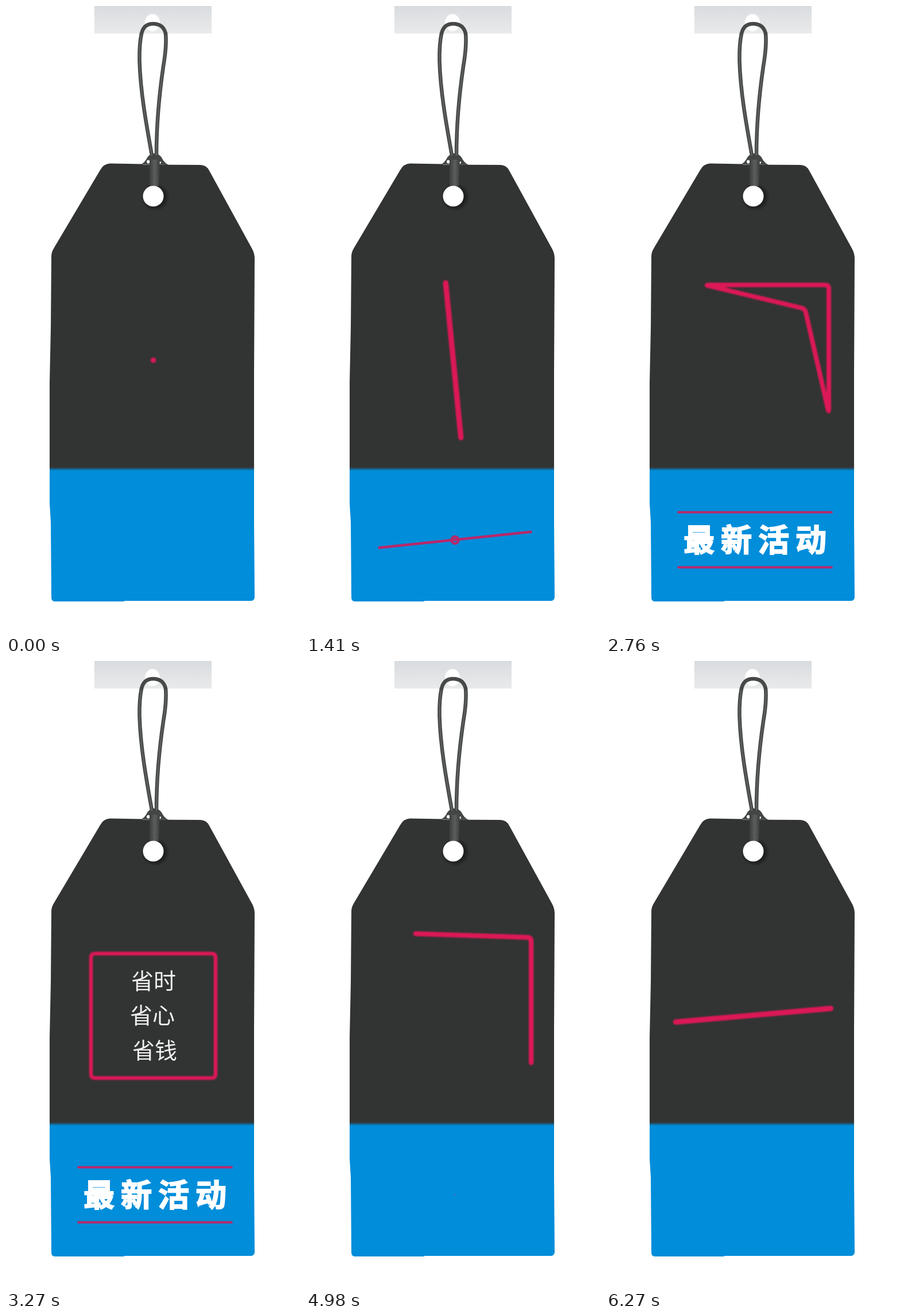
Animation, 512 px wide and 1093 px high, one loop 6300 ms. Source, as an HTML page with a canvas:

```html
<!DOCTYPE html>
<html lang="zh">
<head>
<meta charset="utf-8">
<style>
html, body { margin: 0; width: 100%; height: 100%; overflow: hidden; background: #fff; }
canvas { display: block; }
</style>
</head>
<body>
<canvas id="stage" width="512" height="1093"></canvas>
<script>
const ctx = document.getElementById('stage').getContext('2d');
const LOOP = 6300, STEP = 30;
const PINK = '#dc1857', PLUM = '#b8286a', DARK = '#323433', BLUE = '#008dda';
const CJK = '"Noto Sans CJK SC", "Noto Sans CJK", sans-serif';

const part = (t, a, b) => Math.min(1, Math.max(0, (t - a) / (b - a)));
const sine = p => (1 - Math.cos(Math.PI * p)) / 2;
const cubic = p => p < .5 ? 4 * p ** 3 : 1 - 4 * (1 - p) ** 3;
const mix = (a, b, p) => a + (b - a) * p;
const mixPt = (a, b, p) => [mix(a[0], b[0], p), mix(a[1], b[1], p)];

function stroke(d, color, width) {
  ctx.strokeStyle = color;
  ctx.lineWidth = width;
  ctx.stroke(new Path2D(d));
}
function fill(d, color) {
  ctx.fillStyle = color;
  ctx.fill(new Path2D(d));
}
function oval(x, y, rx, ry, color) {
  ctx.fillStyle = color;
  ctx.beginPath();
  ctx.ellipse(x, y, rx, ry, 0, 0, 7);
  ctx.fill();
}
function gradient(x0, y0, x1, y1, ...colors) {
  const g = ctx.createLinearGradient(x0, y0, x1, y1);
  colors.forEach((c, i) => g.addColorStop(i / (colors.length - 1), c));
  return g;
}
function cord(d) {
  stroke(d, '#3e4040', 6.5);
  stroke(d, '#5a5c5c', 3.5);
}

const tag = new Path2D('M79 436Q79 429 84 421L164 286Q170 275 181 274.5L238 275.5V276.5L338 277Q349 277 354 287' +
  'L429 424Q433 432 433 440L432 640V900L433 1031Q432 1037 426 1037H206V1038H85Q79 1038 79 1031' +
  'L78 900L76 868V655L78 560Z');

function drawTag() {
  fill('M154 0H358V48H154Z', gradient(0, 0, 0, 48, '#d9dcdf', '#e9eaeb'));
  oval(255, 29, 13, 15, '#fff');

  ctx.save();
  ctx.clip(tag);
  ctx.fillStyle = gradient(0, 804, 0, 810, DARK, BLUE);
  ctx.fillRect(0, 0, 512, 1093);
  const shade = ctx.createRadialGradient(260, 333, 16, 260, 333, 25);
  shade.addColorStop(0, '#1c1d1d');
  shade.addColorStop(1, '#1c1d1d00');
  oval(260, 333, 25, 25, shade);
  ctx.restore();

  fill('M236 276Q243 271 246 264Q252 256 258 257Q266 257 271 264Q275 273 283 277Z', '#444646');
  oval(248, 271.5, 3, 3, '#fff');
  oval(268, 273, 2, 2, '#fff');
  cord('M236 48Q232 66 232.5 96C234 150 245 210 254 260');
  cord('M278 48Q280 70 274 105C266 160 262 210 262 260');
  stroke('M236 48Q240 31 256 31Q274 31 278 48', '#474949', 6.5);
  fill('M250 268H268L266 314H250Z', gradient(249, 0, 269, 0, '#383a3a', '#5c5e5e', '#383a3a'));
  oval(256.5, 331.5, 18, 18, '#fff');
}

// Closed outline whose corners are trimmed by a short curve
function outline(pts) {
  const path = new Path2D(), n = pts.length;
  const toward = (a, b) => {
    const d = Math.hypot(b[0] - a[0], b[1] - a[1]);
    return d ? mixPt(a, b, Math.min(.5, 7 / d)) : a;
  };
  pts.forEach((p, i) => {
    path[i ? 'lineTo' : 'moveTo'](...toward(p, pts[(i + n - 1) % n]));
    path.quadraticCurveTo(...p, ...toward(p, pts[(i + 1) % n]));
  });
  path.closePath();
  return path;
}

const ELBOW = [[184, 475], [399, 475], [399, 701], [399, 475]];
const SQUARE = [[148, 510], [365, 510], [365, 727], [148, 727]];

function drawTop(t) {
  const half = 139 * sine(part(t, 0, 690));
  const angle = Math.PI / 2 *
    (cubic(part(t, 684, 1652)) + cubic(part(t, 5466, 6525)));
  const dx = half * Math.cos(angle), dy = half * Math.sin(angle);
  const mid = [256.5, 617.5];
  const line = [[mid[0] - dx, mid[1] - dy], mid, [mid[0] + dx, mid[1] + dy], mid];

  const bend = cubic(part(t, 1760, 2610)) - cubic(part(t, 4785, 5635));
  const open = t < 3690 ? part(t, 2625, 3270) : 1 - part(t, 4110, 4755);
  const shift = Math.sin(open * Math.PI / 2);
  const pts = line.map((p, i) =>
    mixPt(mixPt(p, ELBOW[i], bend), SQUARE[i], i === 3 ? open : shift));
  const path = outline(pts);

  if (open > 0) {
    ctx.save();
    ctx.clip(path);
    ctx.font = '500 39px ' + CJK;
    ctx.textAlign = 'left';
    ctx.fillStyle = '#f0f0f0';
    ctx.fillText('省时', 218, 572);
    ctx.fillText('省心', 216, 632);
    ctx.fillText('省钱', 220, 693);
    ctx.restore();
  }
  ctx.filter = 'blur(1px)';
  ctx.strokeStyle = PINK;
  ctx.lineWidth = 9.5 - bend - 2 * open;
  ctx.stroke(path);
  ctx.filter = 'none';
}

function drawRings(t) {
  const r = t < 1410 ? 6 + 345 * sine(1 - part(t, 0, 1400)) : 6 * (1 - part(t, 1410, 1500));
  if (r <= 0) return;
  const gap = 6 * part(r, 6, 130);
  ctx.strokeStyle = PLUM;
  ctx.lineWidth = 4.5;
  for (const radius of gap ? [r - gap, r + gap] : [r]) {
    ctx.beginPath();
    ctx.arc(259.5, 931, radius, 0, 7);
    ctx.stroke();
  }
}

function drawBottom(t) {
  ctx.save();
  ctx.clip(tag);
  ctx.beginPath();
  ctx.rect(0, 808, 512, 240);
  ctx.clip();
  drawRings(t);

  ctx.translate(259.5, 930.5);
  const gap = 48 * (sine(part(t, 1490, 2040)) - part(t, 3465, 4250) ** 2);
  if (gap > 0) {
    ctx.save();
    ctx.beginPath();
    ctx.rect(-135, -gap, 270, 2 * gap);
    ctx.clip();
    const zoom = 1 + .75 * (1 - gap / 48);
    ctx.scale(zoom, zoom);
    ctx.font = '900 54px ' + CJK;
    ctx.textAlign = 'center';
    ctx.lineJoin = 'miter';
    ctx.fillStyle = ctx.strokeStyle = '#fff';
    ctx.lineWidth = 2;
    [...'最新活动'].forEach((ch, i) => {
      const x = (i - 1.5) * 65;
      ctx.fillText(ch, x, 20.5);
      ctx.strokeText(ch, x, 20.5);
    });
    ctx.restore();
  }

  const away = t < 3000 ? 1 - sine(part(t, 836, 1486)) : sine(part(t, 4250, 4995));
  const half = 135 * (1 - away ** 1.7);
  if (half > 0) {
    ctx.rotate(Math.PI * away * (t < 3000 ? -1 : 1));
    ctx.lineCap = 'butt';
    for (const y of gap > 0 ? [-gap, gap] : [0])
      stroke(`M${-half} ${y}H${half}`, PLUM, gap > 0 ? 4 : 4.5);
  }
  ctx.restore();
}

function draw(now) {
  const t = Math.floor((now % LOOP) / STEP) * STEP;
  ctx.clearRect(0, 0, 512, 1093);
  ctx.lineCap = ctx.lineJoin = 'round';
  drawTag();
  drawTop(t);
  drawBottom(t);
}

const start = performance.now();
(function tick() {
  draw(performance.now() - start);
  requestAnimationFrame(tick);
})();
</script>
</body>
</html>
```
